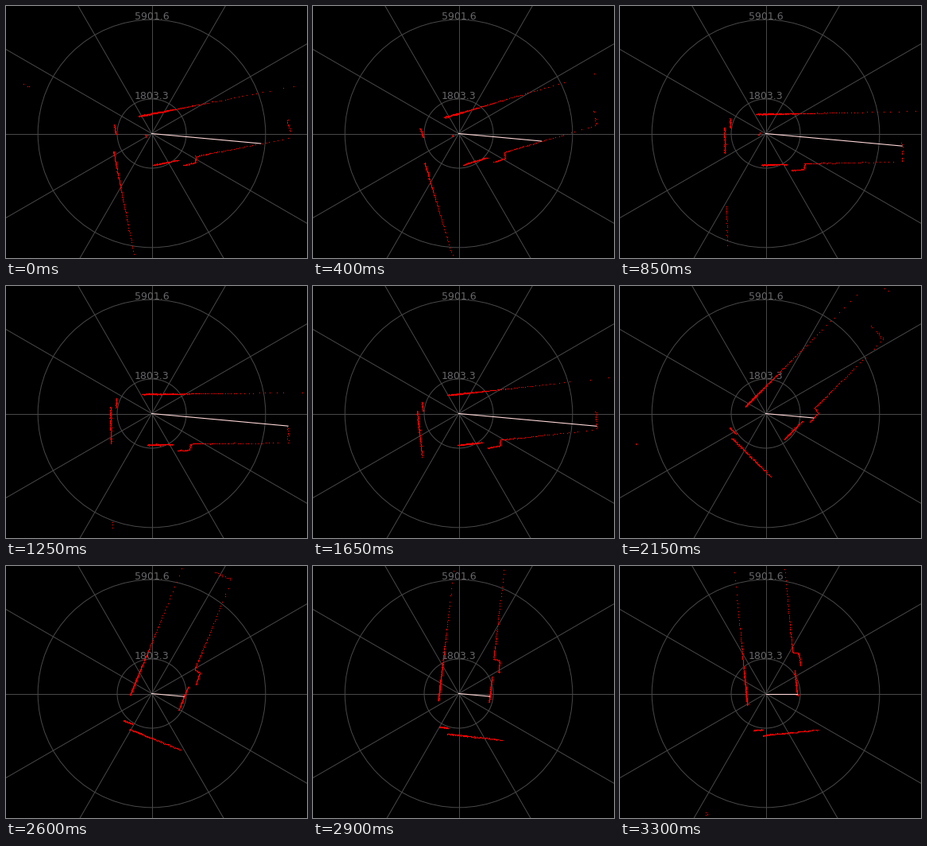
These frames come from a looping animation (379 px wide and 317 px high, 3.4 s). A matplotlib script:

```python
import numpy as np
import matplotlib.pyplot as plt
from matplotlib.animation import FuncAnimation
from matplotlib.patches import Circle

W, H = 379, 317
CX, CY = 183.5, 160.5
TICKS, TICK_MS = 68, 50
SCANS = 50

# Tick at which each scan appears (about 67 ms per scan)
STARTS = (31 * np.arange(SCANS) + 19) // 23

# Room walls around the sensor, in pixels, y down
LEFT_WALL = (-52, -9, -51, 146)
WALLS = [
    (-12, -24.6, 202, -24.6),
    (171.5, 15, 170.5, 38.5),
    (218, -8, 218.5, 12),
    (48.5, 38.5, 171, 38.5),
    (47, 46, 48.5, 38.5),
    (28, 47, 47, 46),
    (-6, 39.2, 26, 39),
    (-44.5, -20, -44.5, -8),
    LEFT_WALL,
]

# Sensor heading (degrees) by scan number
HEADING = ([0, 3, 6, 9, 12, 16, 20, 22, 24, 26, 32, 38, 44, 49],
           [11, 15, 16.4, 6, 1.1, 0.5, 0.8, 2, 6.2, 17, 45, 67.7, 86.5, 95.5])
# Part of the left wall hidden by a passing obstacle
HIDE_FROM = ([0, 7, 9, 12, 24, 32], [-30, -30, 0, 24, 50, 61])
HIDE_TO = ([0, 6, 12, 18, 22], [12, 23, 90, 130, 160])

BEAM = np.radians(np.arange(0, 360, 0.5))


def cast(angles, wall):
    """Distance along each ray to one wall, inf where it misses."""
    x0, y0, x1, y1 = wall
    ex, ey = x1 - x0, y1 - y0
    c, s = np.cos(angles), np.sin(angles)
    den = c * ey - s * ex
    den = np.where(np.abs(den) < 1e-9, 1e-9, den)
    r = (x0 * ey - y0 * ex) / den
    u = (x0 * s - y0 * c) / den
    return np.where((r > 0) & (u >= 0) & (u <= 1), r, np.inf)


def ranges(angles, k):
    best = np.full(angles.shape, np.inf)
    for wall in WALLS:
        r = cast(angles, wall)
        if wall is LEFT_WALL:
            y = np.where(np.isfinite(r), r, 0) * np.sin(angles)
            hidden = (y > np.interp(k, *HIDE_FROM)) & (y < np.interp(k, *HIDE_TO))
            r = np.where(hidden, np.inf, r)
        best = np.minimum(best, r)
    return best


def to_screen(x, y, turn):
    c, s = np.cos(turn), np.sin(turn)
    return np.column_stack([CX + x * c + y * s, CY - x * s + y * c])


def scan(k):
    """Screen points of one scan and the tip of the beam line."""
    rng = np.random.default_rng(k)
    turn = np.radians(np.interp(k, *HEADING))
    r = ranges(BEAM + turn, k)
    keep = np.isfinite(r) & (rng.random(r.size) > np.clip((r - 130) / 130, 0, 0.6))
    r, a = r[keep], BEAM[keep]
    r = r + rng.normal(0, 0.35, r.size) + rng.normal(0, 0.004, r.size) * r
    pts = [np.column_stack([CX + r * np.cos(a), CY + r * np.sin(a)])]

    if k < 14:
        near = rng.normal(0, 1, (2, 5))
        pts.append(to_screen(-8 + 0.6 * near[0], near[1], turn))
    if (k < 5 or k > 28) and k % 5 in (0, 2, 4):
        far = rng.normal(0, 1.5, (2, 3))
        pts.append(to_screen(-143 + far[0], -89 + far[1], turn))

    aim = np.radians(0 if k == SCANS - 1 else 5.2)
    reach = ranges(np.array([aim + turn]), k)[0]
    if not np.isfinite(reach):
        reach = 40
    tip = (CX + reach * np.cos(aim), CY + reach * np.sin(aim))
    return np.vstack(pts), tip


fig = plt.figure(figsize=(W / 72, H / 72), dpi=72, facecolor="black")
ax = fig.add_axes([0, 0, 1, 1])
ax.set(xlim=(0, W), ylim=(H, 0))
ax.axis("off")

GRID = "#484848"
for deg in range(0, 180, 30):
    dx, dy = 400 * np.cos(np.radians(deg)), 400 * np.sin(np.radians(deg))
    ax.plot([CX - dx, CX + dx], [CY - dy, CY + dy], color=GRID, lw=1)
for radius, label in ((143.3, "5901.6"), (43.5, "1803.3")):
    ax.add_patch(Circle((CX, CY), radius, fill=False, ec=GRID, lw=1))
    ax.text(CX, CY - radius - 0.3, label, color="#68686c", fontsize=12.5,
            family="DejaVu Sans", ha="center", va="baseline")

dots = ax.scatter([], [], s=1.3, marker="s", c="#ff0000", linewidths=0, zorder=4)
dots.set_snap(False)
beam, = ax.plot([], [], color="#ffd8d8", lw=1.1, zorder=5)


def update(tick):
    k = int(np.searchsorted(STARTS, tick, side="right")) - 1
    pts, tip = scan(k)
    dots.set_offsets(pts)
    beam.set_data([CX, tip[0]], [CY, tip[1]])
    return dots, beam


anim = FuncAnimation(fig, update, frames=TICKS, interval=TICK_MS,
                     repeat=True, repeat_delay=0)
plt.show()
```
